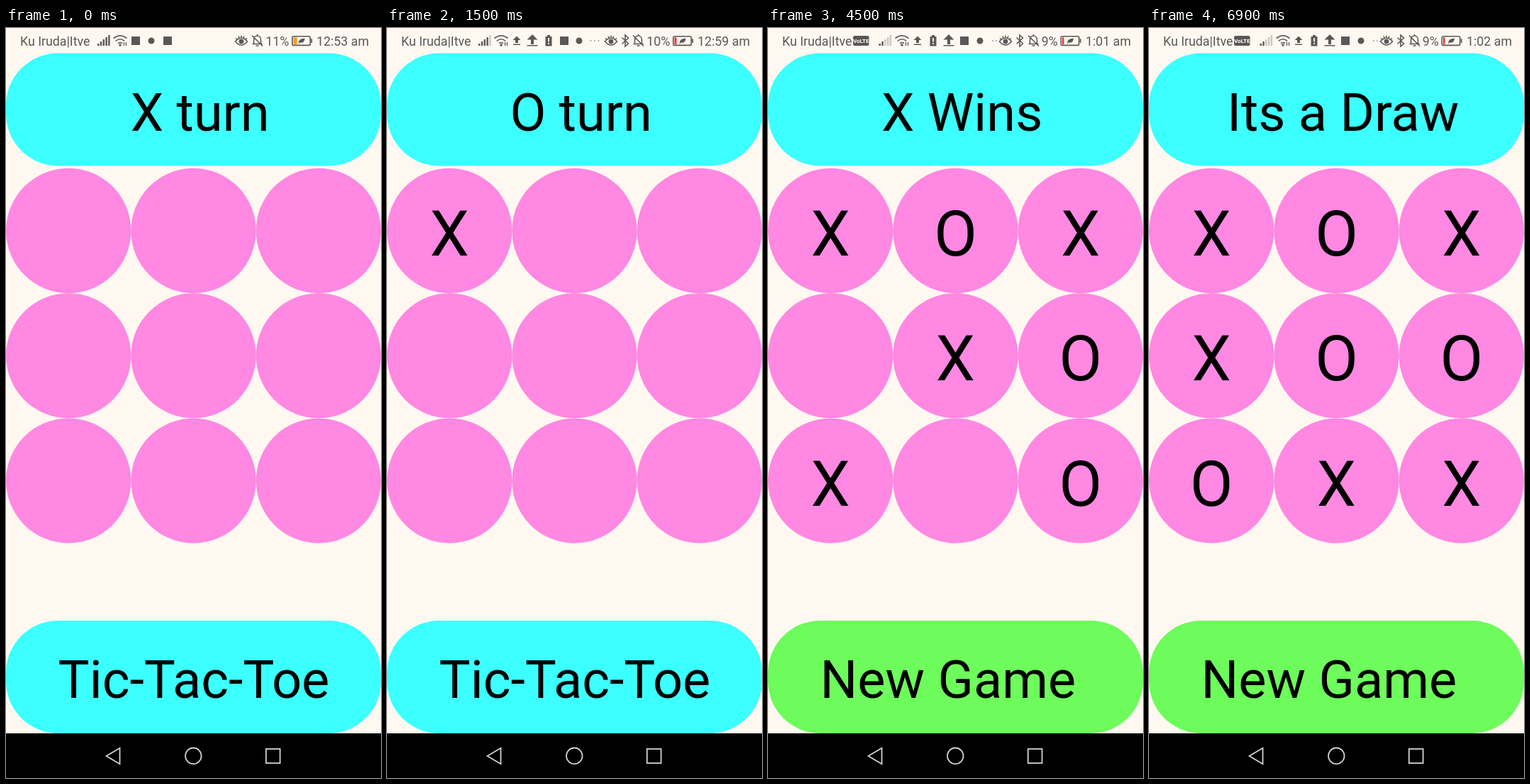
These frames come from a looping animation (529x1058 px, 7500 ms). An HTML page:

```html
<!DOCTYPE html>
<html lang="en">
<head>
<meta charset="utf-8">
<title>Tic-Tac-Toe</title>
<style>
  html, body { margin: 0; width: 100%; height: 100%; overflow: hidden; background: #fff8f1; }
  svg { display: block; width: 529px; height: 1058px; font-family: Roboto, sans-serif; }
  .scene { visibility: hidden; animation: show 7.5s step-end infinite; }
  @keyframes show { 0% { visibility: visible; } 20%, 100% { visibility: hidden; } }
  .label { font-size: 74px; }
  .mark { font-size: 88.17px; text-anchor: middle; }
  .header { text-anchor: middle; }
  .status { font-size: 17.8px; fill: #5a5856; }
  .end { text-anchor: end; }
  .line { fill: none; stroke: #5a5856; stroke-width: 1.6; }
  .solid { fill: #5a5856; }
  .nav { fill: none; stroke: #d2d2d2; stroke-width: 1.8; }
</style>
</head>
<body>
<svg viewBox="0 0 529 1058">
  <defs>
    <g id="wifi" class="line" stroke-width="2">
      <path d="M-9.5 14.5Q0 7 9.5 14.5M-6.2 18.3Q0 13.2 6.2 18.3M-3 21.6Q0 19.3 3 21.6"/>
      <circle cy="24" r="1" class="solid"/>
      <path d="M5.5 20v5M8.5 20v5" stroke-width="1.3"/>
    </g>
    <path id="up" class="solid" d="M0 11.5L5.5 17H2v4H-2V17H-5.5ZM-5 22.5H5V24H-5Z"/>
    <path id="bigUp" class="solid" d="M0 9L7.5 16.5H2V23H-2V16.5H-7.5ZM-7.5 24H7.5V25.5H-7.5Z"/>
    <g id="alert">
      <path class="solid" d="M-2 10H2V12H4.5V25.5H-4.5V12H-2Z"/>
      <path d="M0 14V19.5M0 21V23" stroke="#fff8f1" stroke-width="1.8"/>
    </g>
    <rect id="square" class="solid" x="-6" y="12" width="12" height="12"/>
    <circle id="disc" class="solid" cy="18" r="4.5"/>
    <path id="dots" class="line" stroke-linecap="round" stroke-width="2.6" d="M-5.5 18h.01M0 18h.01M5.5 18h.01"/>
    <path id="twoDots" class="line" stroke-linecap="round" stroke-width="2.6" d="M-2.5 18h.01M2.5 18h.01"/>
    <g id="eye" class="line">
      <path d="M-8.5 19Q0 9 8.5 19Q0 29 -8.5 19ZM-8 14.5L-6 16.2M-4 11.5L-3 13.7M0 10.5V13M4 11.5L3 13.7M8 14.5L6 16.2"/>
      <circle cy="19" r="2.6" class="solid"/>
    </g>
    <path id="bluetooth" class="line" d="M-4.5 13.5L4.5 22L0 26V10L4.5 14L-4.5 22.5"/>
    <path id="bell" class="line" d="M-7 22.5H7M-5 22V17C-5 9 5 9 5 17V22M0 9V11.5M-2 25H2M-7.5 10.5L7.5 25.5"/>
    <g id="battery">
      <rect class="line" x=".8" y="11.8" width="25.4" height="12.6" rx="2" stroke-width="1.4"/>
      <path class="solid" d="M27.3 15.2H29V21H27.3ZM10 21.5Q9 15 18.5 14.5Q18 22 11.5 20.5L9.5 23Z"/>
    </g>
  </defs>

  <rect width="529" height="1058" fill="#fff8f1"/>
  <g id="board" fill="#ff88e2"></g>
  <rect y="995" width="529" height="63"/>
  <g class="nav">
    <path d="M141.5 1027L160.5 1015.8V1038.2Z"/>
    <circle cx="264.3" cy="1026.8" r="11.3"/>
    <rect x="366.8" y="1017" width="19.8" height="20"/>
  </g>
  <g id="scenes"></g>
</svg>
<script>
  const CELL = 529 / 3, BOARD_TOP = 197.8;

  const early = { signalX: 129, wifiX: 161 };
  const late = {
    signalX: 156.5, bars: 2, wifiX: 189, volte: true, percent: '9%', shift: 9.5, charge: '#e33',
    icons: { up: 211, alert: 233, bigUp: 255, square: 277, disc: 299, twoDots: 319.5,
             eye: 335, bluetooth: 355, bell: 374.5 }
  };
  const scenes = [
    { ...early, bars: 5, title: 'X turn', cells: '         ', time: '12:53 am', percent: '11%',
      shift: 0, charge: '#f99a1c',
      icons: { square: 183, disc: 205, square2: 228, eye: 332, bell: 354.5 } },
    { ...early, bars: 4, title: 'O turn', cells: 'X        ', time: '12:59 am', percent: '10%',
      shift: 0, charge: '#e33',
      icons: { up: 183, bigUp: 205, alert: 228, square: 250, disc: 271, dots: 293,
               eye: 316, bluetooth: 336, bell: 354.5 } },
    { ...early, bars: 5, title: 'O Wins', cells: 'XO XOX O ', time: '1:00 am', percent: '9%',
      shift: 9.5, charge: '#e33', over: true,
      icons: { alert: 183, up: 205, bigUp: 228, square: 250, disc: 271, dots: 293,
               eye: 335, bluetooth: 355, bell: 374.5 } },
    { ...late, title: 'X Wins', cells: 'XOX XOX O', time: '1:01 am', over: true },
    { ...late, title: 'Its a Draw', cells: 'XOXXOOOXX', time: '1:02 am', over: true }
  ];

  const text = (x, y, cls, value) => `<text x="${x}" y="${y}" class="${cls}">${value}</text>`;
  const use = (id, x) => `<use href="#${id}" x="${x}"/>`;
  const pill = (y, color) => `<rect y="${y}" width="529" height="159" rx="73.5" fill="${color}"/>`;
  const cellX = i => (i % 3 + .5) * CELL;
  const cellY = i => BOARD_TOP + (Math.floor(i / 3) + .5) * CELL;

  function signal(x, bars) {
    return [0, 1, 2, 3, 4].map(i => {
      const h = 3 + i * 3;
      return `<rect x="${x + i * 3.8}" y="${25 - h}" width="2.4" height="${h}"
        class="solid" opacity="${i < bars ? 1 : .3}"/>`;
    }).join('');
  }

  function statusBar(s) {
    const icons = Object.entries(s.icons).map(([id, x]) => use(id.replace('2', ''), x)).join('');
    const volte = s.volte ? `<rect x="120" y="11" width="22.5" height="14" rx="2" class="solid"/>
      <text x="131.2" y="21" font-size="8" font-weight="700" fill="#fff" text-anchor="middle">VoLTE</text>` : '';
    const chargeWidth = s.shift ? 2.5 : s.percent === '11%' ? 5 : 3;
    return text(20, 24.5, 'status', 'Ku Iruda|Itve') + volte +
      signal(s.signalX, s.bars) + use('wifi', s.wifiX) + icons +
      text(399.2 + s.shift, 24.5, 'status end', s.percent) + use('battery', 403 + s.shift) +
      `<rect x="${405.5 + s.shift}" y="13.3" width="${chargeWidth}" height="9.6" fill="${s.charge}"/>` +
      text(512, 24.5, 'status end', s.time);
  }

  function scene(s, i) {
    const marks = [...s.cells].map((m, n) =>
      m === ' ' ? '' : text(cellX(n), cellY(n) + 35, 'mark', m)).join('');
    return `<g class="scene" style="animation-delay:${i * 1.5}s">` + statusBar(s) +
      pill(35.5, '#3cffff') + text(273.7, 144.5, 'label header', s.title) + marks +
      pill(836, s.over ? '#6dfc5b' : '#3cffff') +
      text(73.5, 945, 'label', s.over ? 'New Game' : 'Tic-Tac-Toe') + '</g>';
  }

  document.getElementById('board').innerHTML = [...Array(9).keys()].map(i =>
    `<circle cx="${cellX(i)}" cy="${cellY(i)}" r="${CELL / 2}"/>`).join('');
  document.getElementById('scenes').innerHTML = scenes.map(scene).join('');
</script>
</body>
</html>
```
